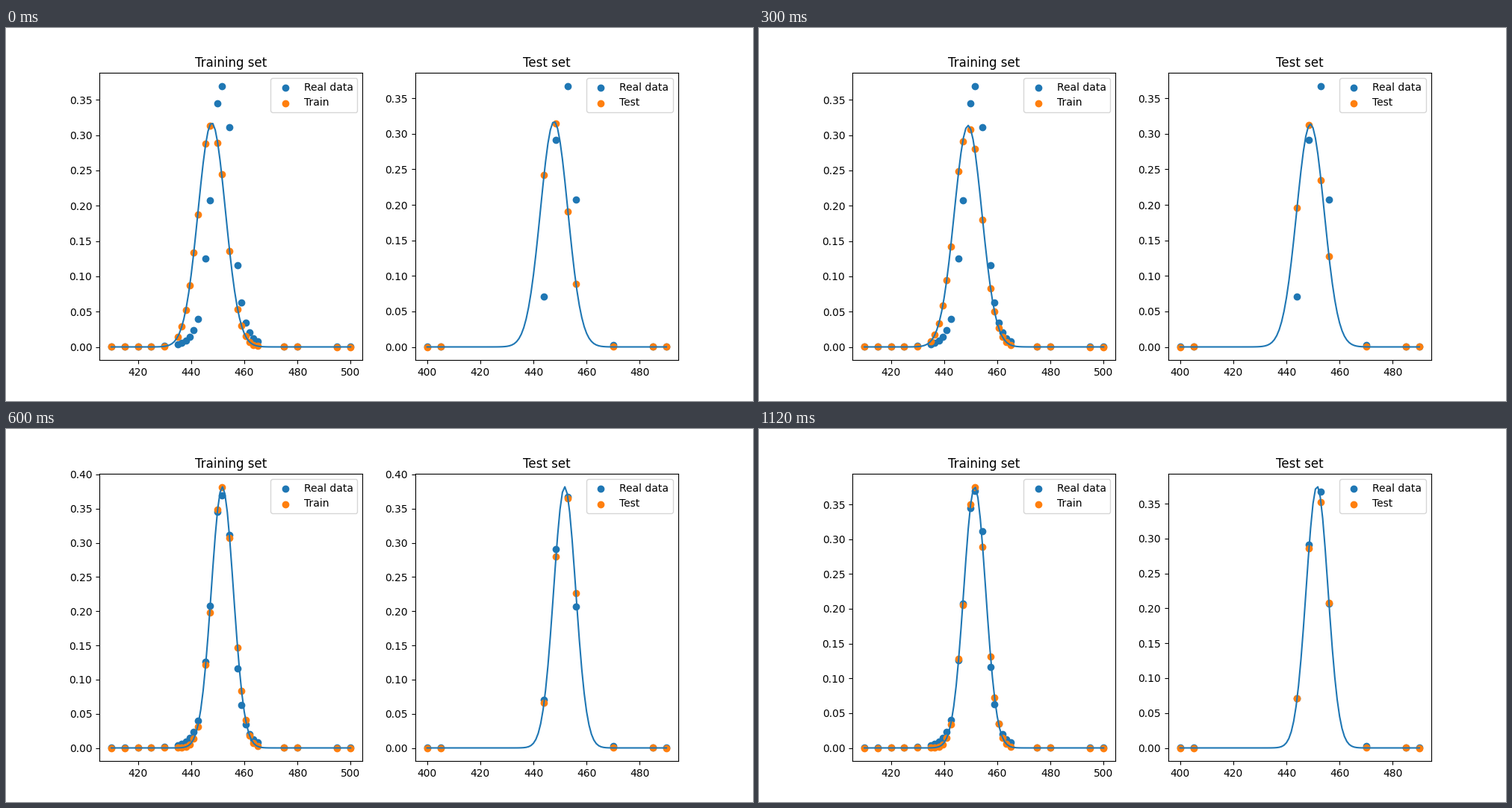
Animation of 1000x500 px, one loop 2220 ms. Source, as a matplotlib script:

```python
import numpy as np
import matplotlib.pyplot as plt
from matplotlib.animation import FuncAnimation

LOOP_MS, STEP_MS = 2220, 10
STARTS = [*range(0, 900, 100), 890, 1120]  # start time of each fitting step

# Height, centre and 2*sigma^2: slow drift, one overshoot, then settling
KEY_STEPS = [0, 2, 4, 5, 6.3]
KEY_FITS = np.array([
    (0.3173, 447.787, 53.1),
    (0.3308, 448.585, 55.4),
    (0.2966, 449.475, 52.5),
    (0.4208, 452.510, 36.24),
    (0.3703, 451.535, 33.8),
])
FINAL_FIT = np.array([0.3754, 451.525, 33.9])
SETTLE_STEP, SETTLE_RATE = 7, 0.3

# Coarse samples in the tails, fine ones across the peak
X = np.concatenate([np.arange(400, 431, 5), np.arange(435, 466, 1.5),
                    np.arange(470, 501, 5)])
IN_TEST = np.isin(X, [400, 405, 444, 448.5, 453, 456, 470, 485, 490])


def measured(x):
    """Resonance peak: the inverse of a quartic around its centre."""
    return 1 / np.polyval([0.0032, 0.0034, 0.040, -0.067, 2.704], x - 451.5)


def gauss(x, height, centre, width):
    return height * np.exp(-(x - centre) ** 2 / width)


def fit_at(step):
    if step > SETTLE_STEP:
        gap = SETTLE_RATE ** (step - SETTLE_STEP)
        return FINAL_FIT + (KEY_FITS[-1] - FINAL_FIT) * gap
    return [np.interp(step, KEY_STEPS, column) for column in KEY_FITS.T]


class Panel:
    def __init__(self, ax, title, label, x):
        self.ax, self.x, self.y = ax, x, measured(x)
        self.grid = np.linspace(x.min(), x.max(), 100)
        ax.scatter(x, self.y, label="Real data")
        self.dots = ax.scatter(x, self.y, label=label)
        self.line, = ax.plot(self.grid, np.zeros_like(self.grid))
        ax.set_title(title)
        ax.legend(loc="upper right")

    def show(self, fit):
        pred, curve = gauss(self.x, *fit), gauss(self.grid, *fit)
        self.dots.set_offsets(np.column_stack([self.x, pred]))
        self.line.set_ydata(curve)
        values = np.concatenate([self.y, pred, curve])
        low, high = values.min(), values.max()
        pad = 0.05 * (high - low)
        self.ax.set_ylim(low - pad, high + pad)


fig, (left, right) = plt.subplots(1, 2, figsize=(10, 5), dpi=100)
panels = [
    Panel(left, "Training set", "Train", X[~IN_TEST]),
    Panel(right, "Test set", "Test", X[IN_TEST]),
]


def update(i):
    step = np.searchsorted(STARTS, i * STEP_MS, side="right") - 1
    fit = fit_at(step)
    for panel in panels:
        panel.show(fit)


anim = FuncAnimation(fig, update, frames=LOOP_MS // STEP_MS, interval=STEP_MS,
                     init_func=lambda: update(0), repeat=True, repeat_delay=0)
plt.show()
```
